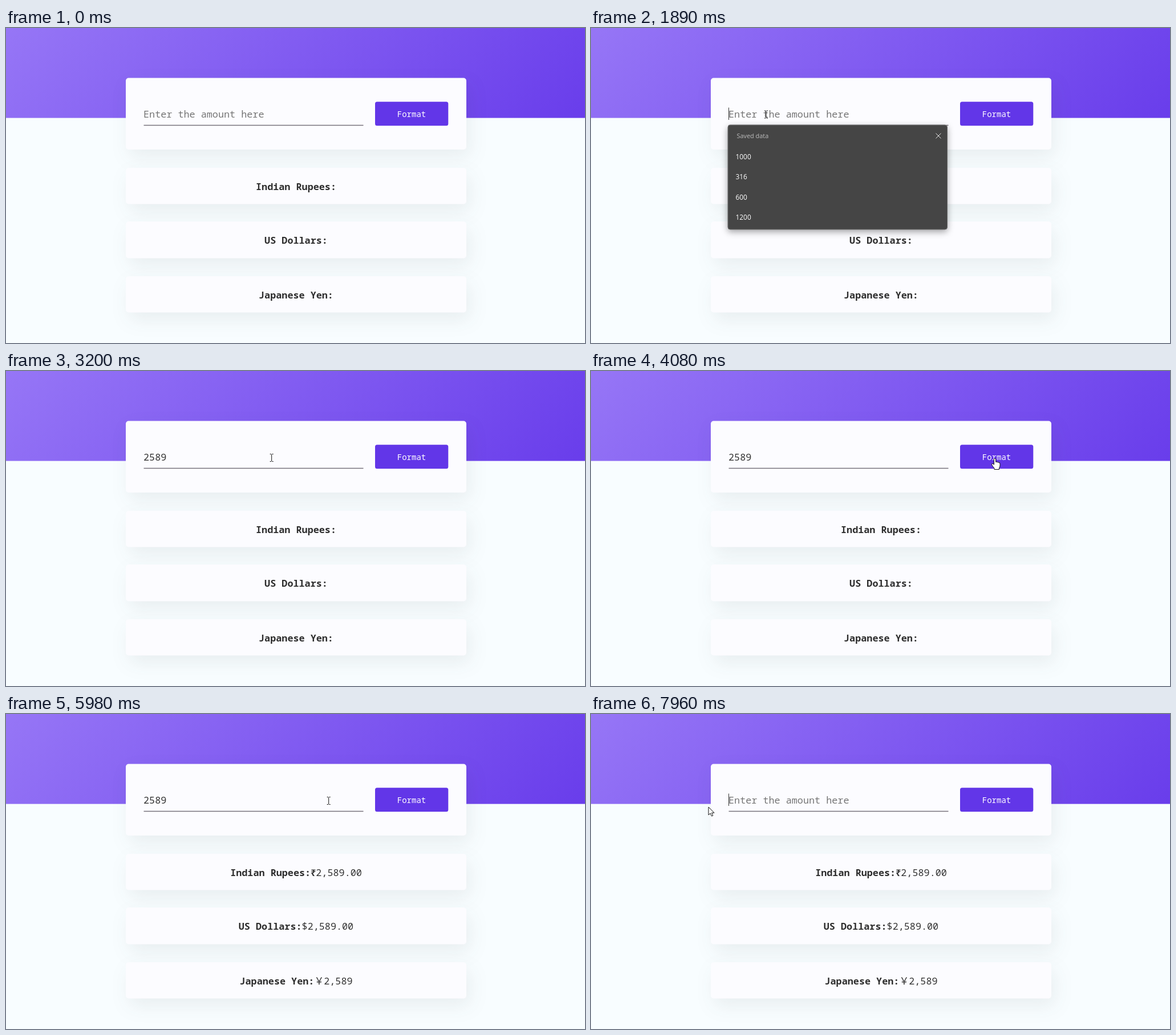
Animation of 1015 by 552 pixels, one loop 8 s. Source, as an HTML page:

```html
<!DOCTYPE html>
<html lang="en">
<head>
<meta charset="utf-8">
<title>Currency formatter</title>
<style>
  html, body { margin: 0; width: 100%; height: 100%; overflow: hidden; }
  svg { display: block; width: 1015px; height: 552px; background: #f8fdff; }
  text { font: 16.8px "Roboto Mono", "Noto Sans Mono", monospace; fill: #333; white-space: pre; }
  .card { fill: #fcfcff; filter: drop-shadow(6px 13px 16px rgba(40, 55, 50, .075)); }
  .row { text-anchor: middle; }
  .row .name { font-weight: 700; fill: #2d2d2d; }
  .rupee { font-family: "Noto Sans", sans-serif; font-size: 16px; font-weight: 600; }
  .yen { font-family: "Noto Sans CJK JP", "Noto Sans CJK", sans-serif; font-weight: 500; }
  #menu rect { fill: #454545; stroke: #6a6a6a; filter: drop-shadow(0 4px 6px rgba(0, 0, 0, .35)); }
  #menu text { font: 11.9px "Open Sans", sans-serif; fill: #fff; }
  #menu .title { font-size: 10.9px; fill: #bdbdbd; }
  #menu path { stroke: #e4e4e4; }
  .cursor { fill: #fff; stroke: #111; stroke-linejoin: round; }
</style>
</head>
<body>
<svg viewBox="0 0 1015 552">
  <linearGradient id="violet" gradientUnits="userSpaceOnUse" x1="214" y1="-214" x2="801" y2="372">
    <stop stop-color="#9676f6"/>
    <stop offset="1" stop-color="#693deb"/>
  </linearGradient>
  <rect width="1015" height="157.6" fill="url(#violet)"/>

  <rect class="card" x="210" y="87.5" width="597" height="125.5" rx="5"/>
  <rect class="card" x="210" y="245" width="597" height="63.5" rx="5"/>
  <rect class="card" x="210" y="339" width="597" height="64.5" rx="5"/>
  <rect class="card" x="210" y="435" width="597" height="63.5" rx="5"/>

  <path d="M241.5 170.5H626.5" stroke="#77727c" stroke-width="1.4"/>
  <rect id="selection" y="140" height="21" fill="#0078d7"/>
  <text id="field" x="241" y="157"></text>
  <rect id="caret" y="139.5" width="1" height="21.5" fill="#333"/>

  <rect x="647" y="129.3" width="128.3" height="42" rx="3.5" fill="#6236e8"/>
  <text x="711" y="155.5" text-anchor="middle" style="font-size:14px;fill:#fff">Format</text>

  <text class="row" x="508.5" y="284"><tspan class="name">Indian Rupees:</tspan><tspan class="value"><tspan class="rupee">₹</tspan>2,589.00</tspan></text>
  <text class="row" x="508.5" y="378"><tspan class="name">US Dollars:</tspan><tspan class="value">$2,589.00</tspan></text>
  <text class="row" x="508.5" y="474"><tspan class="name">Japanese Yen:</tspan><tspan class="value"><tspan class="yen">￥</tspan>2,589</tspan></text>

  <g id="menu">
    <rect x="240" y="170" width="384.5" height="183" rx="4"/>
    <text class="title" x="255.5" y="193">Saved data</text>
    <path d="M604.5 184.5l9 9m0-9l-9 9"/>
    <text x="253.5" y="230">1000</text>
    <text x="253.5" y="265.3">316</text>
    <text x="253.5" y="301">600</text>
    <text x="253.5" y="336">1200</text>
  </g>

  <path id="arrow" class="cursor" d="M0 0V14L3.2 11 5.5 16 7.8 15 5.6 10.2H10Z"/>
  <path id="beam" class="cursor" style="fill:none" d="M-3-6.5H-.7M.7-6.5H3M0-6V6M-3 6.5H-.7M.7 6.5H3"/>
  <path id="hand" class="cursor" d="M-1.6 11V1.2Q0-.8 1.6 1.2V6.5Q3.2 5.2 4.4 7Q6 6 7 7.8Q9 7 9 9.5V13Q8.7 15.5 7.5 17V19.5H-1V17.5Q-3.5 14.5-5.3 11.5Q-5.8 9-3.6 9.3Z"/>
</svg>
<script>
const LOOP = 8000, CHAR = 10.08, LEFT = 241;
const ENTER = 150, FOCUS = 1800, BLUR = 4400, RESULT = 4600;
const REFOCUS = 6600, DRAG = 6880, RELEASE = 7550, CLEAR = 7750;

// time, value of the field
const edits = [[0, ""], [FOCUS, ""], [2140, "2"], [2300, "25"], [2430, "258"], [2560, "2589"],
  [REFOCUS, "2589"], [CLEAR, ""]];

// time, x, y of the pointer
const path = [[ENTER, 395, 518], [900, 392, 512], [1550, 307, 151.5], [2900, 307, 151.5],
  [3600, 708, 153], [4800, 708, 153], [5250, 696, 153], [5700, 696, 153],
  [6450, 283.5, 150], [DRAG, 283.5, 150], [7450, 206, 163], [LOOP, 206, 163]];

const $ = id => document.getElementById(id);
const values = document.querySelectorAll(".value");
const show = (el, on) => { el.style.display = on ? "" : "none"; };
const inside = (x, y, l, t, r, b) => x >= l && x <= r && y >= t && y <= b;

function pointerAt(t) {
  const i = Math.max(1, path.findIndex(p => p[0] > t));
  const [t0, x0, y0] = path[i - 1], [t1, x1, y1] = path[i];
  const u = Math.max(0, (t - t0) / (t1 - t0)), k = u * u * (3 - 2 * u);
  return [x0 + (x1 - x0) * k, y0 + (y1 - y0) * k];
}

function drawPointer(t, x, y) {
  const dragging = t >= DRAG && t < RELEASE;
  let kind = "arrow";
  if (dragging || inside(x, y, 241, 135, 626, 171)) kind = "beam";
  else if (inside(x, y, 647, 129, 775, 171)) kind = "hand";
  for (const id of ["arrow", "beam", "hand"]) show($(id), id === kind && t >= ENTER);
  $(kind).setAttribute("transform", `translate(${x} ${y})`);
}

function drawField(t, x) {
  const [since, text] = edits.filter(e => e[0] <= t).pop();
  const field = $("field");
  const count = text.length;

  let start = count;
  if (t >= DRAG && t < CLEAR) start = Math.min(count, Math.max(0, Math.round((x - LEFT) / CHAR)));
  const selected = count - start;

  field.textContent = "";
  const add = (part, fill) => {
    const span = document.createElementNS("http://www.w3.org/2000/svg", "tspan");
    span.textContent = part;
    span.style.fill = fill;
    field.append(span);
  };
  if (count) {
    add(text.slice(0, start), "#333");
    add(text.slice(start), "#fff");
  } else add("Enter the amount here", "#757575");

  $("selection").setAttribute("x", LEFT + start * CHAR);
  $("selection").setAttribute("width", selected * CHAR);

  const focused = t >= FOCUS && t < BLUR || t >= REFOCUS;
  show($("caret"), focused && !selected && (t - since) % 1000 < 500);
  $("caret").setAttribute("x", LEFT + count * CHAR);
}

function draw(now) {
  const t = now % LOOP;
  const [x, y] = pointerAt(t);
  drawField(t, x);
  drawPointer(t, x, y);
  show($("menu"), t >= FOCUS && t < 2140);
  values.forEach(v => show(v, t >= RESULT));
  requestAnimationFrame(draw);
}
draw(performance.now());
</script>
</body>
</html>
```
